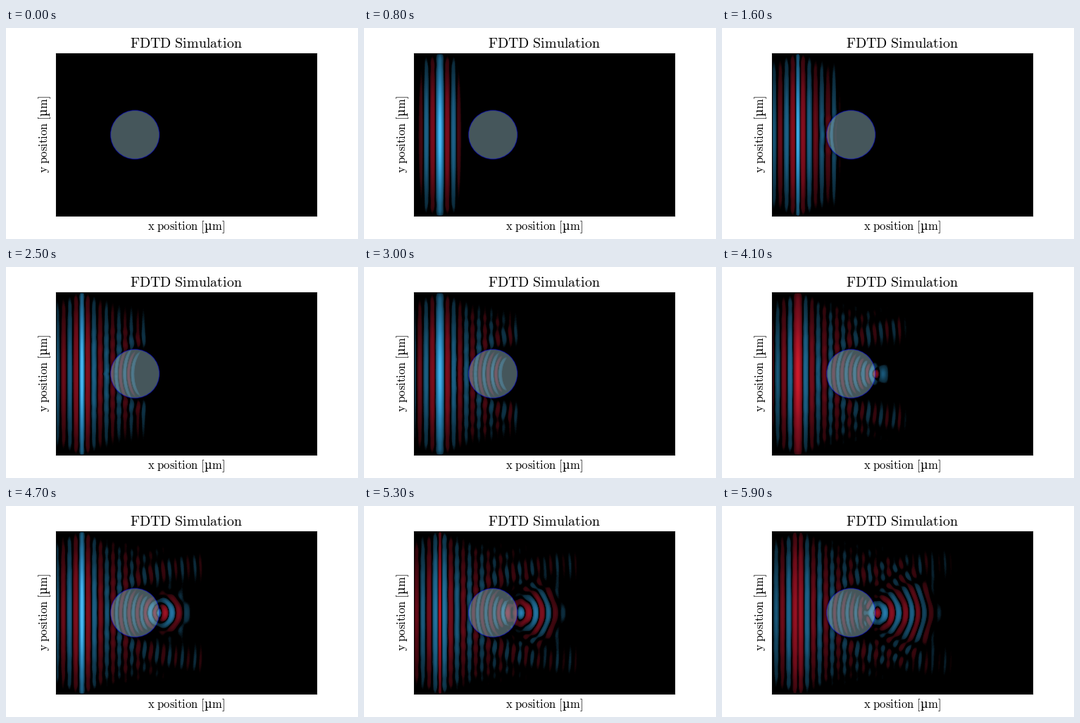
Recreate the animation shown at these times as a matplotlib script. Size 500x300 px, loop 6 s.

```python
import numpy as np
import matplotlib.pyplot as plt
from matplotlib.animation import FuncAnimation
from matplotlib.colors import LinearSegmentedColormap
from matplotlib.patches import Circle

plt.rcParams.update({"mathtext.fontset": "cm", "font.size": 12,
                     "font.family": "DejaVu Serif"})

FRAMES, INTERVAL = 60, 100
SUBSTEPS = 4                      # time steps per frame
CELL = 2.0                        # pixels per grid cell
SPEED = 4.11                      # pixels per frame
PERIOD = 4.374                    # frames per oscillation
START = PERIOD / 8                # switch-on time of the emitter
INDEX = 1.46                      # refractive index of the ball
PAD = 12                          # absorbing cells
NX, NY, NZ = 186, 58, 30          # visible length, half height, half depth

EMITTER_X = 108.0
EMITTER_WIDTH = 60.0
BALL_X, BALL_Y, BALL_R = 183.2, 151.7, 34.6
LEFT, RIGHT, TOP, BOTTOM = 71.25, 441.25, 36, 267
FIRST_X = 72.0                    # centre of the first visible column


def laplacian(u):
    """Seven-point stencil, mirrored at the y = 0 and z = 0 planes."""
    lap = -6 * u
    lap[1:] += u[:-1]
    lap[:-1] += u[1:]
    lap[:, 1:] += u[:, :-1]
    lap[:, :-1] += u[:, 1:]
    lap[:, 0] += u[:, 1]
    lap[:, :, 1:] += u[:, :, :-1]
    lap[:, :, :-1] += u[:, :, 1:]
    lap[:, :, 0] += u[:, :, 1]
    return lap


def absorber(depth):
    return np.exp(-(0.04 * np.clip(depth, 0, None)) ** 2)


def simulate():
    """Return the mid-plane field for every frame."""
    i = np.arange(-PAD, NX)
    j = np.arange(NY + PAD)
    k = np.arange(NZ + PAD)
    x = (FIRST_X + CELL * i)[:, None, None]
    y = (CELL * j)[None, :, None]
    z = (CELL * k)[None, None, :]

    r = np.sqrt((x - BALL_X) ** 2 + y ** 2 + z ** 2)
    inside = np.clip((BALL_R - r) / CELL + 0.5, 0, 1)
    eps = 1 + (INDEX ** 2 - 1) * inside
    courant = SPEED / SUBSTEPS / CELL
    gain = (courant ** 2 / eps).astype(np.float32)

    damp = (absorber(1 - i)[:, None, None]
            * absorber(j - NY + 1)[None, :, None]
            * absorber(k - NZ + 1)[None, None, :]).astype(np.float32)

    row = PAD + int((EMITTER_X - FIRST_X) / CELL)
    profile = np.exp(-(CELL * j) ** 2 / (2 * EMITTER_WIDTH ** 2))
    profile[NY:] = 0
    profile = (4 * courant ** 2 * profile).astype(np.float32)

    u = np.zeros(gain.shape, np.float32)
    prev = u.copy()
    slices = []
    for step in range((FRAMES - 1) * SUBSTEPS + 1):
        if step % SUBSTEPS == 0:
            half = u[PAD:, :NY, 0].T
            slices.append(np.vstack([half[:0:-1], half]))
        t = step / SUBSTEPS - START
        new = laplacian(u)
        new *= gain
        new += 2 * u
        new -= prev
        if t > 0:
            new[row, :, 0] += profile * np.float32(np.cos(2 * np.pi * t / PERIOD))
        new *= damp
        u *= damp
        prev, u = u, new
    return slices


def field_map():
    levels = [0.035, 0.06, 0.2, 0.5, 1]
    blues = [(0, 0, 0), (12, 42, 58), (25, 88, 122), (40, 127, 178), (70, 185, 245)]
    reds = [(0, 0, 0), (48, 6, 12), (105, 12, 25), (150, 18, 35), (225, 30, 45)]
    stops = [(0.5 - v / 2, c) for v, c in zip(levels, blues)][::-1]
    stops += [(0.5 + v / 2, c) for v, c in zip(levels, reds)]
    return LinearSegmentedColormap.from_list(
        "field", [(p, np.array(c) / 255) for p, c in stops], N=512)


fields = simulate()

fig, ax = plt.subplots(figsize=(5, 3), dpi=100)
ax.set_facecolor("black")
image = ax.imshow(fields[0], cmap=field_map(), vmin=-1.2, vmax=1.2,
                  interpolation="bicubic",
                  extent=(FIRST_X - CELL / 2, FIRST_X + CELL * (NX - 0.5),
                          BALL_Y + CELL * (NY - 0.5), BALL_Y - CELL * (NY - 0.5)))
ax.add_patch(Circle((BALL_X, BALL_Y), BALL_R, fc="lightblue", ec="blue", alpha=0.4))
ax.set(xlim=(LEFT, RIGHT), ylim=(BOTTOM, TOP), xticks=[], yticks=[], aspect="equal")
ax.set_title(r"$\mathrm{FDTD\ Simulation}$")
ax.set_xlabel(r"$\mathrm{x\ position\ [}$µ$\mathrm{m]}$")
ax.set_ylabel(r"$\mathrm{y\ position\ [}$µ$\mathrm{m]}$")


def draw(frame):
    image.set_data(fields[frame])
    return [image]


anim = FuncAnimation(fig, draw, frames=FRAMES, interval=INTERVAL,
                     repeat=True, repeat_delay=0)
plt.show()
```
